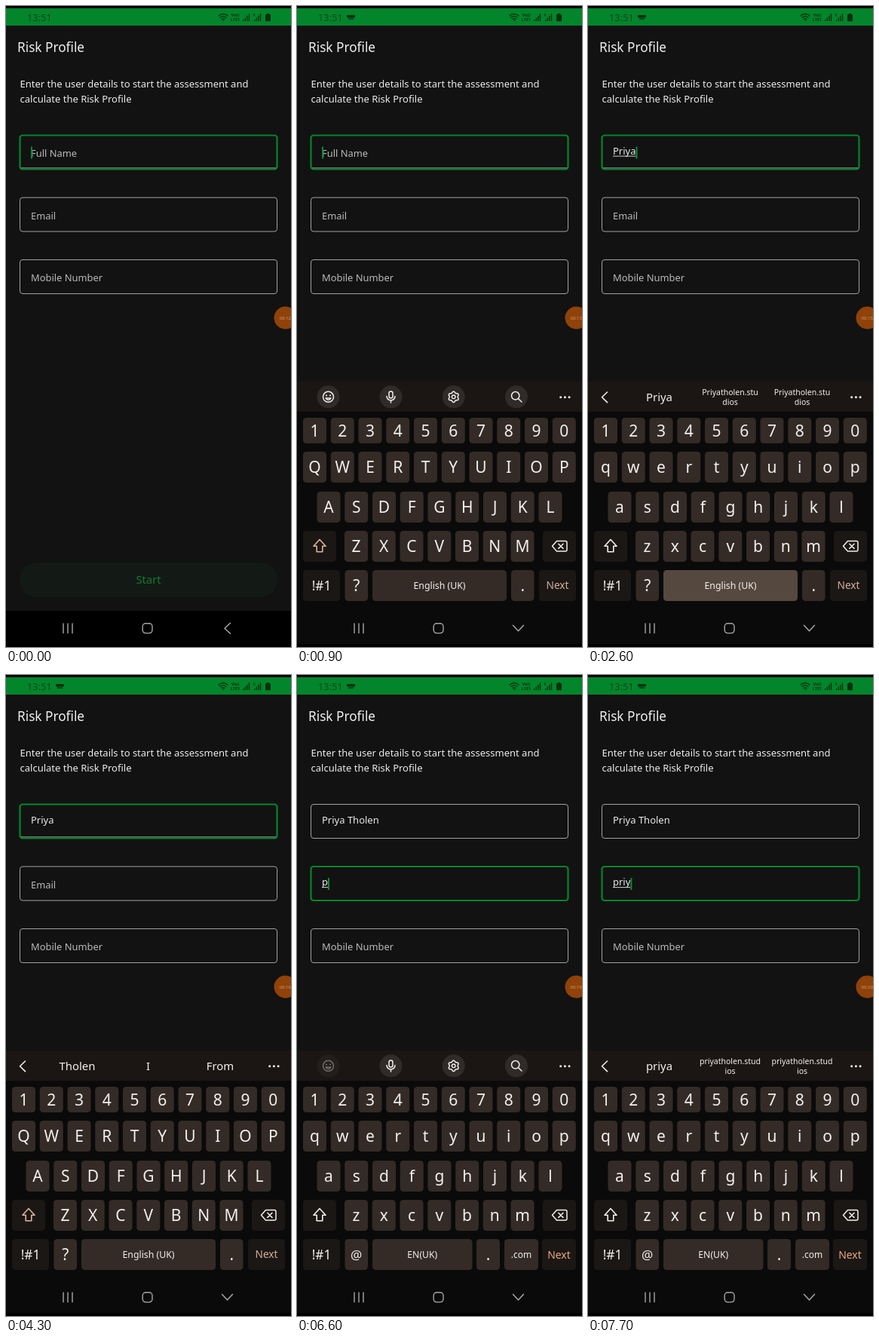
Recreate the animation shown at these times as an HTML page. Size 378 by 850 pixels, loop 8000 ms.

```html
<!DOCTYPE html>
<html lang="en">
<head>
<meta charset="utf-8">
<title>Risk Profile</title>
<style>
  html, body { margin: 0; width: 100%; height: 100%; overflow: hidden; background: #121212; }
  svg { display: block; width: 100%; height: 100%; font-family: "Noto Sans", "Open Sans", sans-serif; }
  text { white-space: pre; }
  .mid { text-anchor: middle; }
  .line { fill: none; stroke-linecap: round; stroke-linejoin: round; }
</style>
</head>
<body>
<svg id="stage" viewBox="0 0 378 850"></svg>
<script>
const LOOP = 8000;
const GREEN = '#03852b', KEY = '#342b26', FN_KEY = '#1b1715', PRESSED = '#55483f', INK = '#f3f0ee';
const ACCENT = '#e0b596';
const stage = document.getElementById('stage');

function el(tag, attrs, parent = stage) {
  const node = document.createElementNS('http://www.w3.org/2000/svg', tag);
  for (const k in attrs) node.setAttribute(k, attrs[k]);
  return parent.appendChild(node);
}
const group = (parent) => el('g', {}, parent);
const rect = (x, y, width, height, fill, rx = 0, parent) => el('rect', { x, y, width, height, fill, rx }, parent);
const path = (d, stroke, w, parent) => el('path', { d, stroke, 'stroke-width': w, class: 'line' }, parent);
const dot = (cx, cy, r, fill, parent) => el('circle', { cx, cy, r, fill }, parent);
function label(str, x, y, size, fill, parent, cls = '') {
  const node = el('text', { x, y, 'font-size': size, fill, class: cls }, parent);
  node.textContent = str;
  return node;
}
const set = (node, name, value) => { if (node.getAttribute(name) !== String(value)) node.setAttribute(name, value); };
const show = (node, on) => set(node, 'visibility', on ? 'inherit' : 'hidden');
const write = (node, str) => { if (node.textContent !== str) node.textContent = str; };
const within = (t, [a, b]) => t >= a && t < b;
const ramp = (t, a, b) => Math.min(1, Math.max(0, (t - a) / (b - a)));
// Latest entry [time, ...] that has started
const latest = (list, t) => list.filter(e => e[0] <= t).pop();

// ---- Status bar ----
rect(0, 0, 378, 850, '#121212');
rect(0, 0, 378, 3, '#000');
rect(0, 3, 378, 23, GREEN);
const DARK = '#05300f';
label('13:51', 28, 19.5, 12.5, '#07461b').setAttribute('letter-spacing', .2);
const kbMark = group();
rect(66, 12, 11, 3.6, DARK, .8, kbMark);
rect(68, 16.4, 7, 1.4, DARK, 0, kbMark);
path('M282 13Q288 8 294 13M284 15.3Q288 12 292 15.3M286 17.4Q288 16 290 17.4', DARK, 1.3);
dot(288.5, 19, 1, DARK);
label('Vo))', 304, 14.3, 5.5, DARK, stage, 'mid').setAttribute('font-weight', 700);
label('LTE1', 304, 20, 5.5, DARK, stage, 'mid').setAttribute('font-weight', 700);
for (let i = 0; i < 4; i++) {
  const h = 2 + i * 2.6;
  rect(314 + i * 2.6, 20 - h, 1.4, h, DARK);
  rect(329 + i * 2.6, 20 - h, 1.4, h, DARK);
}
label('R', 327.5, 13.5, 5, DARK);
rect(344, 11, 7, 9.2, DARK, 1);
rect(346, 9.8, 3, 1.5, DARK);

// ---- Form ----
label('Risk Profile', 15, 61.3, 17.2, '#f0f0f0');
label('Enter the user details to start the assessment and', 18.5, 108.3, 13, '#ececec');
label('calculate the Risk Profile', 18.5, 128.3, 13, '#ececec');

function makeField(y, hint) {
  const box = el('rect', { x: 18.5, y: y + .5, width: 341, height: 45, rx: 3.5, fill: 'none' });
  const base = rect(20, y + 43, 338, 1.4, '#6c7a70');
  return {
    box, base,
    hint: label(hint, 33, y + 29.2, 12.9, '#b9b9b9'),
    text: label('', 33, y + 25.6, 13, '#e9e9e9'),
    under: rect(33, y + 27.6, 0, 1, '#cfcfcf'),
    caret: rect(33, y + 15.5, 2, 16, '#0a8a34')
  };
}
const nameField = makeField(171, 'Full Name');
const mailField = makeField(253.5, 'Email');
const phoneField = makeField(336, 'Mobile Number');

function drawField(f, focused, str, composing, caretOn, underlined) {
  set(f.box, 'stroke', focused ? GREEN : '#a2a2a2');
  set(f.box, 'stroke-width', focused ? 2.2 : 1);
  show(f.base, focused && underlined);
  show(f.hint, !str);
  write(f.text, str);
  const w = str ? f.text.getComputedTextLength() : 0;
  set(f.under, 'width', composing ? w : 0);
  set(f.caret, 'x', 33 + w);
  show(f.caret, focused && caretOn);
}

rect(18, 738, 342, 46, '#131a15', 23);
label('Start', 189, 766.3, 14.8, '#127a34', stage, 'mid');

// ---- Recorder badge ----
dot(370.5, 413.5, 15, '#8f4209');
const clock = label('', 362.5, 415.6, 6, '#d69b6c');

// ---- Keyboard ----
const board = group();
rect(0, 498, 378, 352, '#0a0a0a', 0, board);
rect(0, 498, 378, 40, '#1b1614', 0, board);
for (const x of [349.7, 355.4, 361.1]) dot(x, 518.8, 1.5, INK, board);

const tools = group(board);
const emoji = group(tools);
for (const x of [41.5, 124.5, 207.7, 291]) dot(x, 518.3, 15, '#302b29', x < 50 ? emoji : tools);
el('circle', { cx: 41.5, cy: 518.3, r: 7, stroke: INK, 'stroke-width': 1.5, class: 'line' }, emoji);
dot(39, 516.5, 1.1, INK, emoji);
dot(44, 516.5, 1.1, INK, emoji);
path('M38 520Q41.5 524.5 45 520Z', INK, 1.3, emoji);
el('rect', { x: 122, y: 511, width: 5, height: 9, rx: 2.5, stroke: INK, 'stroke-width': 1.5, class: 'line' }, tools);
path('M119 517.5a5.5 5.5 0 0 0 11 0M124.5 523v3', INK, 1.5, tools);
let gear = '';
for (let i = 0; i <= 48; i++) {
  const a = i * Math.PI / 24, r = 6.3 + .9 * Math.cos(6 * a);
  gear += (i ? 'L' : 'M') + (207.7 + r * Math.sin(a)).toFixed(2) + ' ' + (518.3 - r * Math.cos(a)).toFixed(2);
}
path(gear + 'Z', INK, 1.5, tools);
el('circle', { cx: 207.7, cy: 518.3, r: 2.3, stroke: INK, 'stroke-width': 1.4, class: 'line' }, tools);
el('circle', { cx: 289.7, cy: 516.8, r: 5.2, stroke: INK, 'stroke-width': 1.5, class: 'line' }, tools);
path('M293.6 520.8L298 525', INK, 1.5, tools);

const hints = group(board);
path('M25.5 512L18.5 518.8L25.5 525.6', INK, 1.6, hints);
const slots = [94.5, 188.5, 284].map(x => ({
  one: label('', x, 524, 14.9, INK, hints, 'mid'),
  top: label('', x, 516, 10.5, INK, hints, 'mid'),
  low: label('', x, 529, 10.5, INK, hints, 'mid')
}));

const keys = {}, letters = [];
function key(id, str, x, y, w, h, opts = {}) {
  const { fill = KEY, size = 21, ink = INK, parent = board } = opts;
  const shape = rect(x, y, w, h, fill, 4.5, parent);
  const text = label(str, x + w / 2, y + h / 2 + size * .36, size, ink, parent, 'mid');
  keys[id] = { shape, text, fill, cx: x + w / 2, y };
  return keys[id];
}
const STEP = 36.75;
[['1234567890', 8, 546, 34], ['qwertyuiop', 8, 591, 41], ['asdfghjkl', 26.5, 644, 41], ['zxcvbnm', 63, 696, 41]]
  .forEach(([chars, x, y, h]) => [...chars].forEach((c, i) => {
    const k = key(c, c, x + i * STEP, y, 31, h);
    if (y > 560) letters.push([c, k.text]);
  }));

rect(8, 696, 44, 41, FN_KEY, 4.5, board);
const shift = path('M30 707.5L38 716.3H33.8V723.8H26.2V716.3H22Z', INK, 1.6, board);
rect(326, 696, 44, 41, FN_KEY, 4.5, board);
path('M344.5 709.5H356Q358 709.5 358 711.5V721Q358 723 356 723H344.5L338.5 716.3Z', INK, 1.5, board);
path('M346.8 713.2L353 719.4M353 713.2L346.8 719.4', INK, 1.5, board);

key('sym', '!#1', 8, 748, 49, 41, { fill: FN_KEY, size: 17.3 });
const plainRow = group(board), mailRow = group(board);
key('?', '?', 63.5, 748, 30.5, 41, { parent: plainRow });
key(' ', 'English (UK)', 100, 748, 178, 41, { size: 12.3, parent: plainRow });
key('.', '.', 284, 748, 30.5, 41, { parent: plainRow });
key('next', 'Next', 321, 748, 49, 41, { fill: FN_KEY, size: 13.7, ink: '#d3b099', parent: plainRow });
key('@', '@', 63.5, 748, 30.5, 41, { size: 17, parent: mailRow });
key('lang', 'EN(UK)', 100, 748, 132.5, 41, { size: 12.2, parent: mailRow });
key('dot', '.', 238, 748, 31, 41, { parent: mailRow });
key('com', '.com', 275, 748, 45, 41, { size: 12, parent: mailRow });
key('go', 'Next', 325, 748, 45, 41, { fill: FN_KEY, size: 13.9, ink: '#eba97c', parent: mailRow });

const popup = group(board);
rect(-28.2, 0, 56.4, 73, '#392f29', 7, popup);
const popupText = label('', 0, 47.5, 28, INK, popup, 'mid');

// ---- Navigation bar ----
rect(0, 802, 378, 48, '#000');
const navTint = rect(0, 802, 378, 44, '#0a0a0a');
const NAV = '#a6a6a6';
path('M76 819V831.5M82 819V831.5M88 819V831.5', NAV, 1.4);
el('rect', { x: 181.2, y: 818.8, width: 12.8, height: 12.8, rx: 4, stroke: NAV, 'stroke-width': 1.4, class: 'line' });
const back = path('M297.5 818.3L290 825.3L297.5 832.3', NAV, 1.5);

// ---- Timeline (ms) ----
const LONG = 'Priyatholen.stu|dios', LONG_LOW = 'priyatholen.stud|ios';
const nameSteps = [[0, ''], [1400, 'P'], [1600, 'Pr'], [1800, 'Pri'], [2000, 'Priy'], [2300, 'Priya'],
  [2700, 'Priya '], [4500, 'Priya Tholen ']];
const mailSteps = [[0, ''], [6500, 'p'], [6850, 'pr'], [7250, 'pri'], [7500, 'priy']];
const hintSteps = [[0, '', '', ''], [1500, 'P', 'I', 'Priya'], [1650, 'Pr', 'Pre', LONG], [1850, 'Pri', 'Pre', LONG],
  [2050, 'Priy', 'Priya', LONG], [2350, 'Priya', LONG, LONG], [2800, 'Tholen', 'I', 'And'],
  [3100, 'Tholen', 'I', 'From'], [4600, 'And', 'I', 'From'], [6750, 'p', 'priya', LONG_LOW],
  [6950, 'pr', 'priya', LONG_LOW], [7300, 'pri', 'priya', LONG_LOW], [7550, 'priya', LONG_LOW, LONG_LOW]];
const presses = [['p', 1300, 1450], ['r', 1500, 1650], ['i', 1700, 1800], ['y', 1850, 2050], ['a', 2200, 2400],
  [' ', 2550, 2700], ['p', 6400, 6550], ['r', 6750, 6900], ['i', 7100, 7250], ['y', 7400, 7550]];
const caretOff = [[400, 900], [3300, 3800], [4300, 4500], [5700, 6200]];

function drawHints(t) {
  const [start, ...words] = latest(hintSteps, t);
  words.forEach((word, i) => {
    const [a, b] = word.split('|'), s = slots[i];
    write(s.one, b ? '' : a);
    write(s.top, b ? a : '');
    write(s.low, b || '');
  });
  // A freshly typed letter is still fading in
  const growing = words[0].length > 1 && words[0].length < 5 && t - start < 120;
  if (growing) {
    slots[0].one.textContent = words[0].slice(0, -1);
    const tip = el('tspan', { 'fill-opacity': .4 }, slots[0].one);
    tip.textContent = words[0].slice(-1);
  } else if (slots[0].one.children.length) {
    slots[0].one.textContent = words[0];
  }
}

function draw(t) {
  const inMail = t >= 5200, mailKeys = t >= 5300;
  const caretOn = !caretOff.some(span => within(t, span));
  const name = latest(nameSteps, t)[1], mail = latest(mailSteps, t)[1];
  drawField(nameField, !inMail, name, t < 2700, caretOn, true);
  drawField(mailField, inMail, mail, true, caretOn, false);
  drawField(phoneField, false, '', false, false, false);
  write(clock, '00:' + (12 + Math.floor((t + 500) / 1000)));

  const rise = 1 - (1 - ramp(t, 100, 600)) ** 3;
  set(board, 'transform', `translate(0 ${((1 - rise) * 348).toFixed(2)})`);
  show(board, rise > 0);
  show(kbMark, t >= 400);
  set(navTint, 'opacity', rise.toFixed(3));
  set(back, 'transform', `rotate(${(-90 * ramp(t, 100, 400)).toFixed(1)} 293.5 825.3)`);

  const hintMix = mailKeys ? ramp(t, 6650, 6800) : ramp(t, 1450, 1550);
  set(tools, 'opacity', 1 - hintMix);
  set(hints, 'opacity', hintMix);
  set(emoji, 'opacity', t >= 6550 || within(t, [1400, 1600]) ? .4 : 1);
  drawHints(t);

  const upper = t < 1450 || within(t, [2800, 5300]);
  for (const [c, text] of letters) write(text, upper ? c.toUpperCase() : c);
  set(shift, 'stroke', upper ? ACCENT : INK);
  show(plainRow, !mailKeys);
  show(mailRow, mailKeys);

  const press = presses.find(([, a, b]) => within(t, [a, b]));
  const id = press && press[0];
  for (const k in keys) set(keys[k].shape, 'fill', k === id ? PRESSED : keys[k].fill);
  show(popup, id && id !== ' ');
  if (id) {
    const k = keys[id];
    set(popup, 'transform', `translate(${Math.min(k.cx, 346)} ${k.y - 80})`);
    write(popupText, upper ? id.toUpperCase() : id);
  }
}

const start = performance.now();
function tick() {
  draw((performance.now() - start) % LOOP);
  requestAnimationFrame(tick);
}
tick();
</script>
</body>
</html>
```
